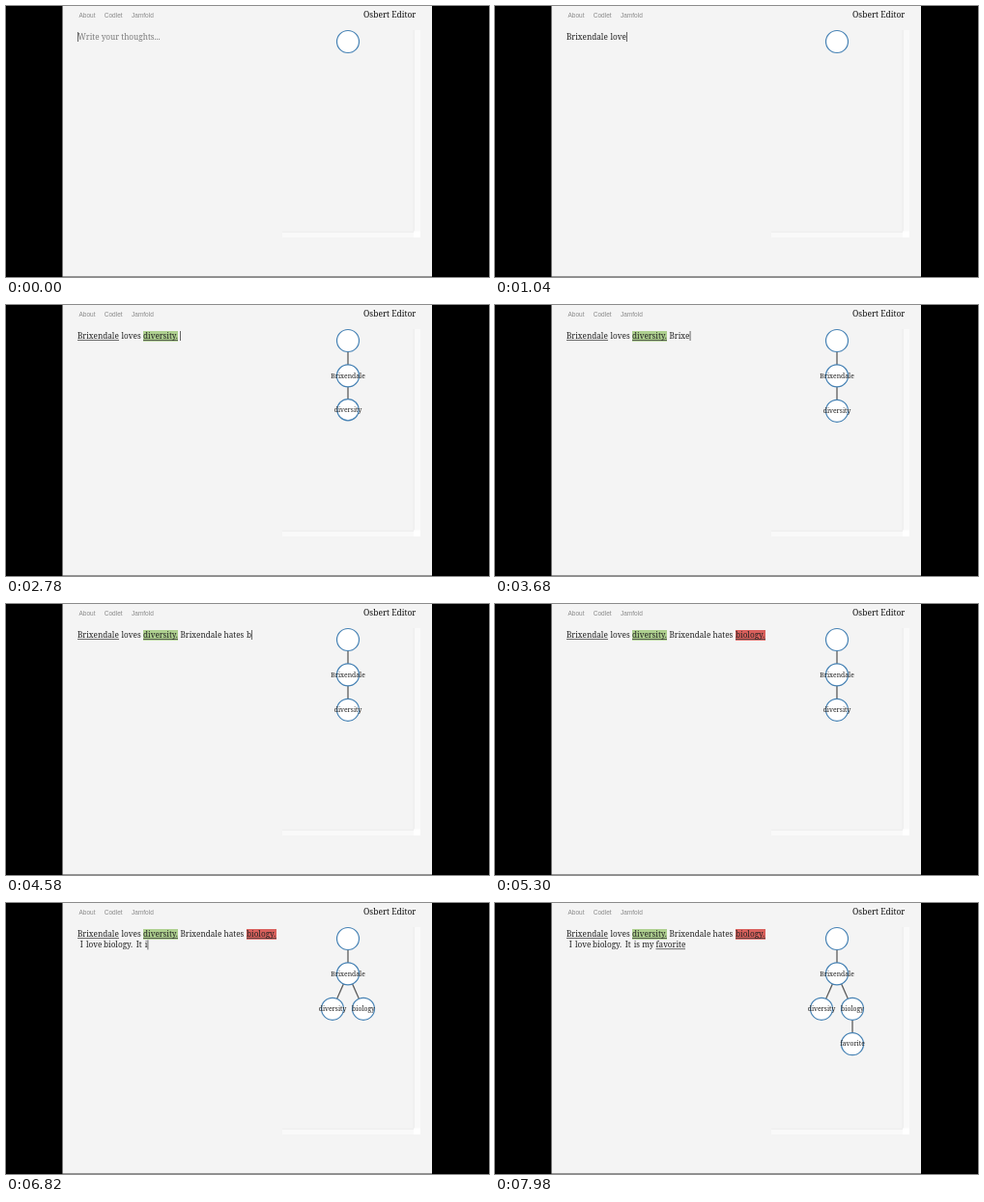
Write an HTML page that moves like this. It is 500 px wide and 281 px high and loops after 8 s.

```html
<!DOCTYPE html>
<html lang="en">
<head>
<meta charset="utf-8">
<title>Osbert Editor</title>
<style>
  html, body { margin: 0; width: 100%; height: 100%; overflow: hidden; background: #000; }
  svg { display: block; width: 100%; height: 100%; }
  text { white-space: pre; }
  .nav { font: 6.5px "Liberation Sans", Arial, sans-serif; fill: #8a8a8a; }
  .title { font: 8.5px "Noto Serif", serif; fill: #111; text-anchor: end; }
  .write { font: 8.2px "Noto Serif", serif; fill: #222; }
  .hint { fill: #7b7b7b; }
  .label { font: 6.8px "Noto Serif", serif; fill: #222; text-anchor: middle; }
  circle { fill: #fff; stroke: #4682b4; stroke-width: 1.2; }
  .link { stroke: #5c5c5c; stroke-width: 1.3; }
  #caret { fill: #444; }
</style>
</head>
<body>
<svg viewBox="0 0 500 281">
  <rect x="58.5" width="382.5" height="280.2" fill="#f4f4f4"/>
  <rect x="58.5" y="280.2" width="382.5" height=".8" fill="#aaa"/>
  <text class="nav" x="75.5" y="11.8">About</text>
  <text class="nav" x="101.8" y="11.8">Codlet</text>
  <text class="nav" x="130" y="11.8">Jamfold</text>
  <text class="title" x="424.3" y="12.4">Osbert Editor</text>

  <rect x="422" y="25" width="7" height="209" fill="#f9f9f9"/>
  <rect x="286" y="234" width="136" height="6" fill="#f9f9f9"/>
  <path d="M422.3 25V234.3H286" fill="none" stroke="#e8e8e8" stroke-width=".7"/>
  <rect x="422" y="233.5" width="7" height="6.5" fill="#fff"/>

  <g id="marks"></g>
  <text id="hint" class="write hint" x="74.3" y="34.6">Write your thoughts...</text>
  <g id="words"></g>
  <rect id="caret" width=".8" height="10"/>
  <g id="links"></g>
  <g id="nodes"></g>
</svg>
<script>
const LOOP = 8000, MOVE = 500, BLINK = 340, LINE = 11.4;
const $ = id => document.getElementById(id);

function add(parent, tag, attrs) {
  const el = document.createElementNS("http://www.w3.org/2000/svg", tag);
  set(el, attrs);
  parent.appendChild(el);
  return el;
}
function set(el, attrs) {
  for (const key in attrs) el.setAttribute(key, attrs[key]);
}
const mix = (a, b, p) => a + (b - a) * p;
function ease(t) {
  const p = Math.max(0, Math.min(1, t / MOVE));
  return p < .5 ? 4 * p ** 3 : 1 - 4 * (1 - p) ** 3;
}

// text, x, line, first key, ms per key, caret x after the space, time of the space
const words = [
  ["Brixendale", 74, 0, 40, 70, 119.5],
  ["loves", 119.5, 0, 810, 70, 142],
  ["diversity.", 142, 0, 1230, 67, 180.2],
  ["Brixendale", 180.5, 0, 3420, 58, 225.5],
  ["hates", 225.5, 0, 4180, 52, 249],
  ["biology.", 249, 0, 4580, 27.5, 281.8],
  ["I", 76.8, 1, 5560, 60, 83],
  ["love", 83, 1, 5680, 75, 101],
  ["biology.", 101, 1, 6100, 54, 134.8],
  ["It", 134.8, 1, 6590, 60, 143.7],
  ["is", 143.7, 1, 6800, 50, 152.2],
  ["my", 152.2, 1, 6940, 30, 166.5],
  ["favorite", 166.5, 1, 7030, 35, 198.7, 7640]
].map(([text, x, line, start, step, after, space = start + step * text.length]) => ({
  text, x, line, start, step, after, space,
  el: add($("words"), "text", { class: "write", x, y: 34.6 + line * LINE })
}));

// x, width, line, start, highlight
const marks = [
  [74, 43, 0, 1120, "none"],
  [142, 36, 0, 2380, "#aed08f"],
  [249, 31, 0, 5280, "#d9605c"],
  [166.5, 30.5, 1, 7490, "none"]
].map(([x, width, line, start, fill]) => {
  const el = add($("marks"), "g", {}), y = 27 + line * LINE;
  add(el, "rect", { x, y, width, height: 10.8, fill });
  add(el, "rect", { x, y: y + 9, width, height: .7, fill: "#333" });
  return { el, start };
});

const root = node("", null, 354, 37, -MOVE);
const person = node("Brixendale", root, 354, 73.4, 1120);
const likes = node("diversity", person, 354, 109.8, 2380);
const hates = node("biology", person, 370, 109.8, 5280);
const best = node("favorite", hates, 370, 146.2, 7490);
Object.assign(likes, { shiftTo: 338, shiftAt: 5280 });
const nodes = [root, person, likes, hates, best];

function node(name, parent, x, y, start) {
  const link = parent && add($("links"), "line", { class: "link" });
  const el = add($("nodes"), "g", {});
  const dot = add(el, "circle", {});
  const label = add(el, "text", { class: "label", y: 2.2 });
  label.textContent = name;
  return { parent, x, y, start, link, el, dot, label };
}

function place(n, t) {
  const x = n.shiftAt ? mix(n.x, n.shiftTo, ease(t - n.shiftAt)) : n.x;
  if (!n.parent) return [x, n.y];
  const [px, py] = place(n.parent, t), p = ease(t - n.start);
  return [mix(px, x, p), mix(py, n.y, p)];
}

function drawText(t) {
  let x = 74.1, line = 0, lastKey = 0;
  for (const w of words) {
    const count = Math.max(0, Math.min(w.text.length, Math.floor((t - w.start) / w.step) + 1));
    const shown = w.text.slice(0, count);
    if (w.el.textContent !== shown) w.el.textContent = shown;
    if (!count) continue;
    const spaced = t >= w.space;
    x = spaced ? w.after : w.x + w.el.getComputedTextLength() + .2;
    line = w.line;
    lastKey = spaced ? w.space : w.start + (count - 1) * w.step;
  }
  const on = Math.floor((t - lastKey) / BLINK) % 2 === 0;
  set($("caret"), { x, y: 27 + line * LINE, visibility: on ? "visible" : "hidden" });
  set($("hint"), { visibility: t < 40 ? "visible" : "hidden" });
  for (const m of marks) set(m.el, { visibility: t >= m.start ? "visible" : "hidden" });
}

function drawTree(t) {
  for (const n of nodes) {
    const visibility = t >= n.start ? "visible" : "hidden";
    const p = ease(t - n.start), [x, y] = place(n, t);
    set(n.el, { transform: `translate(${x} ${y})`, visibility });
    set(n.dot, { r: 11.5 * p });
    set(n.label, { "fill-opacity": p });
    if (n.link) {
      const [x1, y1] = place(n.parent, t);
      set(n.link, { x1, y1, x2: x, y2: y, visibility });
    }
  }
}

const begin = performance.now();
function frame() {
  const t = (performance.now() - begin) % LOOP;
  drawText(t);
  drawTree(t);
  requestAnimationFrame(frame);
}
frame();
</script>
</body>
</html>
```
